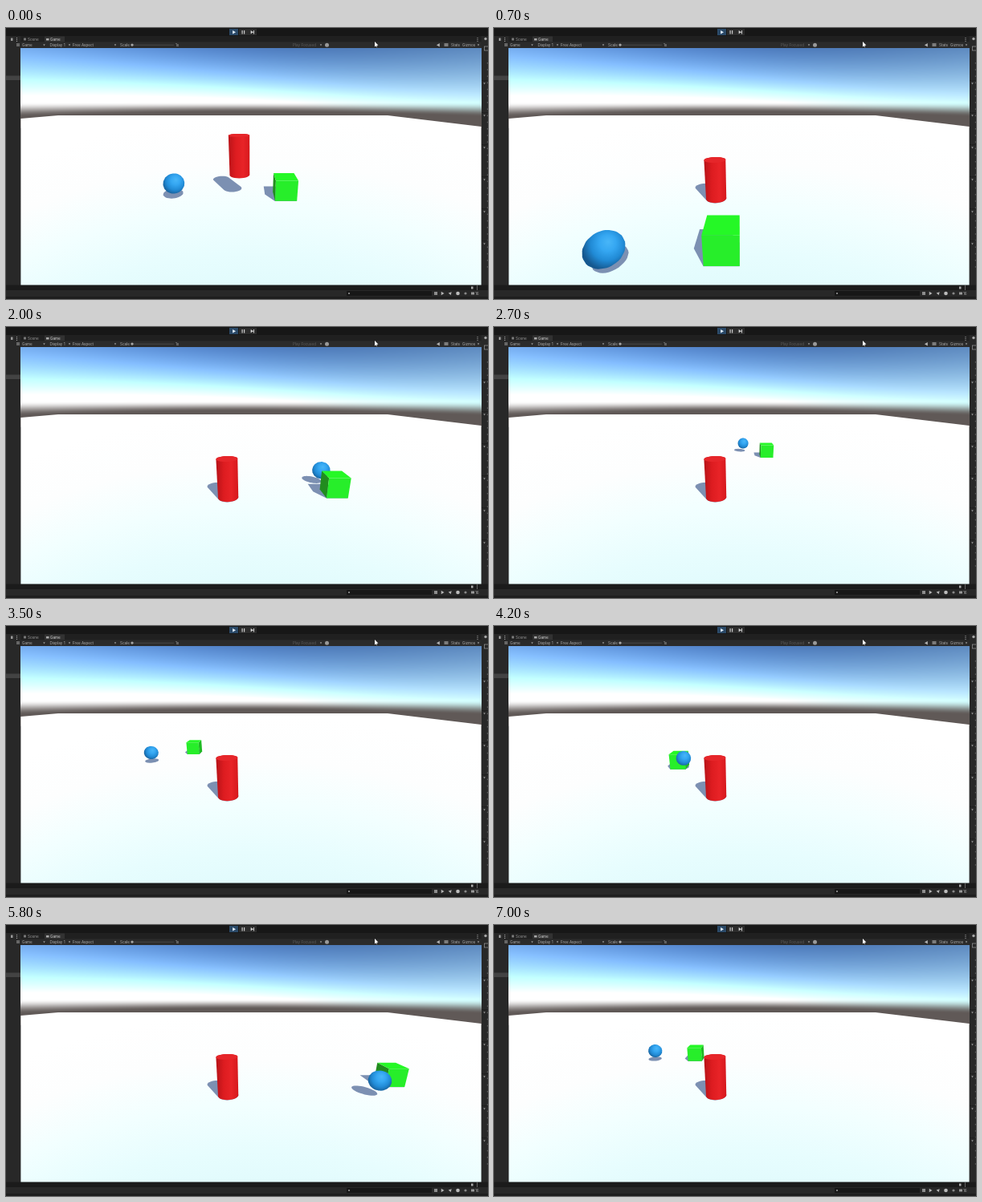
An HTML page with a canvas for the animation above (7.1 s loop, 600 px wide and 338 px high).

```html
<!DOCTYPE html>
<html>
<head>
<meta charset="utf-8">
<style>
  html, body { margin: 0; width: 100%; height: 100%; overflow: hidden; background: #1c1c1c; }
  canvas { display: block; }
</style>
</head>
<body>
<canvas id="stage" width="600" height="338"></canvas>
<script>
const stage = document.getElementById('stage');
let ctx = stage.getContext('2d');

// World: x to the right, y measured down from the camera, z away from it.
const FOCAL = 255.5, CX = 305, CY = 172.5, GROUND = 4.35;
const SIN = Math.sin(17.5 * Math.PI / 180), COS = Math.cos(17.5 * Math.PI / 180);
const LIGHT = [-.32, .77, .56];
const VIEW = { left: 18.4, top: 25, right: 591.6, bottom: 320.6 };

// Key poses on the ground: seconds, sphere x, z, cube x, z
const POSES = [
  [0, -3.55, 8.78, 1.6, 8.97],
  [.5, -4.7, 5.9, .4, 6.8],
  [.9, -1.6, 3.4, -.9, 3.7],
  [1.5, 3.22, 5.47, 2.27, 4.48],
  [2.1, 3.6, 11.6, 4.1, 10.2],
  [2.7, .36, 17.9, 2.22, 16.3],
  [3.5, -7.09, 14.17, -4.8, 17.06],
  [4.1, -4.6, 12.5, -4.6, 13.2],
  [4.9, 5.26, 15.43, 2.47, 14.78],
  [5.8, 5.92, 8.77, 7.4, 10.2],
  [6.4, -.1, 10.2, 4.7, 10],
  [7, -6.04, 14.4, -3.2, 14.78]
];

// Smooth curve through the key poses
function poseAt(t) {
  const last = POSES.length - 1;
  let i = 0;
  while (i < last - 1 && POSES[i + 1][0] <= t) i++;
  const a = POSES[i], b = POSES[i + 1], span = b[0] - a[0], u = (t - a[0]) / span;
  const slope = (k, c) => {
    const p = POSES[Math.max(k - 1, 0)], q = POSES[Math.min(k + 1, last)];
    return (q[c] - p[c]) / (q[0] - p[0]) * span;
  };
  return [1, 2, 3, 4].map(c =>
    a[c] * (1 + 2 * u) * (1 - u) ** 2 + slope(i, c) * u * (1 - u) ** 2 +
    b[c] * u * u * (3 - 2 * u) + slope(i + 1, c) * u * u * (u - 1));
}

function project([x, y, z]) {
  const depth = z * COS + y * SIN, up = z * SIN - y * COS;
  return [CX + FOCAL * x / depth, CY - FOCAL * up / depth];
}

function castShadow([x, y, z]) {
  const reach = (GROUND - y) / LIGHT[1];
  return [x + LIGHT[0] * reach, GROUND, z + LIGHT[2] * reach];
}

function hull(points) {
  points.sort((a, b) => a[0] - b[0] || a[1] - b[1]);
  const chain = list => {
    const out = [];
    for (const p of list) {
      while (out.length > 1) {
        const [a, b] = out.slice(-2);
        if ((b[0] - a[0]) * (p[1] - a[1]) - (b[1] - a[1]) * (p[0] - a[0]) > 0) break;
        out.pop();
      }
      out.push(p);
    }
    return out.slice(0, -1);
  };
  return [...chain(points), ...chain([...points].reverse())];
}

function polygon(points, fill) {
  ctx.beginPath();
  points.forEach(p => ctx.lineTo(...p));
  ctx.closePath();
  ctx.fillStyle = fill;
  ctx.fill();
}

function blend(gradient, ...colors) {
  colors.forEach((color, i) => gradient.addColorStop(i / (colors.length - 1), color));
  return gradient;
}

function ring(x, y, z, r) {
  return Array.from({ length: 28 }, (_, i) => {
    const a = i / 28 * 2 * Math.PI;
    return [x + r * Math.cos(a), y, z + r * Math.sin(a)];
  });
}

function sphere(x, z) {
  const y = 3.6, radius = .465, points = [];
  for (let i = -4; i <= 4; i++) {
    const a = i * Math.PI / 9;
    points.push(...ring(x, y + radius * Math.sin(a), z, radius * Math.cos(a)));
  }
  return { z, points, draw() {
    const [px, py] = project([x, y, z]), r = FOCAL * radius / (z * COS + y * SIN);
    const fill = ctx.createRadialGradient(px + r * .2, py - r * .4, 0, px + r * .1, py - r * .2, r * 1.35);
    polygon(hull(points.map(project)), blend(fill, '#48b6f8', '#35a7f2', '#218bd6', '#15588f'));
  } };
}

function cylinder(x, y, z) {
  const top = ring(x, y - .94, z, .475), points = [...top, ...ring(x, y + .94, z, .475)];
  return { z, points, draw() {
    const px = project([x, y, z])[0], fill = ctx.createLinearGradient(px - 14, 0, px + 14, 0);
    polygon(hull(points.map(project)), blend(fill, '#b81318', '#dd1c20', '#e82327', '#d4181c'));
    polygon(top.map(project), '#e6262a');
  } };
}

function cube(x, z) {
  const corner = ([i, j, k]) => [x + i / 2, 3.84 + j / 2, z + k / 2];
  const square = [[-1, -1], [1, -1], [1, 1], [-1, 1]];
  const face = (at, fill) => polygon(square.map(([a, b]) => project(corner(at(a, b)))), fill);
  const points = [-1, 1].flatMap(k => square.map(([i, j]) => corner([i, j, k])));
  return { z, points, draw() {
    if (Math.abs(x) > .5) {
      const side = -Math.sign(x);
      face((a, b) => [side, a, b], side < 0 ? '#218c1e' : '#1fb923');
    }
    face((a, b) => [a, -1, b], '#25f826');
    face((a, b) => [a, b, -1], '#27ee2a');
  } };
}

// Sky: colour falls off with elevation and is scattered brighter away from the sun
function skyColor(px, py) {
  const v = (CY - py) / FOCAL, h = (px - CX) / FOCAL, length = Math.hypot(1, h, v);
  const up = (v * COS - SIN) / length, ahead = (COS + v * SIN) / length, side = h / length;
  const toSun = side * LIGHT[0] - up * LIGHT[1] + ahead * LIGHT[2];
  const phase = .75 + .75 * toSun ** 2, height = Math.max(up, 0);
  const haze = Math.min(1, Math.max(0, -up / .045)), soil = haze * haze * (3 - 2 * haze);
  return [[275, .2, 96], [330, .27, 89], [350, .5, 87]].map(([glow, fade, ground]) =>
    Math.min(255, glow * Math.exp(-height / fade) * phase) * (1 - soil) + ground * soil);
}

function drawSky() {
  const { left, top, right } = VIEW, x0 = Math.floor(left), w = Math.ceil(right) - x0, h = 100;
  const image = ctx.createImageData(w, h);
  for (let i = 0; i < w * h; i++) {
    image.data.set([...skyColor(x0 + i % w, top + Math.floor(i / w)), 255], i * 4);
  }
  ctx.putImageData(image, x0, top);
}

function drawFloor() {
  const { left, right, bottom } = VIEW;
  polygon([[left, 113], [65, 109], [475, 109], [right, 123], [right, bottom], [left, bottom]],
    blend(ctx.createRadialGradient(310, 900, 560, 310, 900, 790),
      '#dffafc', '#e7fdfe', '#f2ffff', '#fdfefe', '#ffffff'));
}

function box(x, y, w, h, color) {
  ctx.fillStyle = color;
  ctx.fillRect(x, y, w, h);
}

function label(text, x, y = 22.8, color = '#adadad') {
  ctx.font = '4.6px Inter, Roboto, sans-serif';
  ctx.fillStyle = color;
  ctx.fillText(text, x, y);
}

function dot(x, y, r, color = '#a6a6a6') {
  ctx.beginPath();
  ctx.arc(x, y, r, 0, 7);
  ctx.fillStyle = color;
  ctx.fill();
}

function triangle(x, y, r, angle, color = '#b4b4b4') {
  polygon([0, 1, 2].map(i => {
    const a = angle + i * 2 * Math.PI / 3;
    return [x + r * Math.cos(a), y + r * Math.sin(a)];
  }), color);
}

const arrow = (x, y) => triangle(x, y, 1.4, Math.PI / 2, '#999');

function menuDots(x, y) {
  for (let i = 0; i < 3; i++) box(x, y + 2 * i, 1, 1, '#aaa');
}

function drawEditor() {
  const { left, top, right, bottom } = VIEW;
  box(0, 0, 600, 338, '#282828');
  box(0, 0, 600, 10, '#171717');
  box(left, 10, right - left, 7.5, '#202020');
  box(48, 10.5, 25, 7, '#323232');
  box(left, 17.5, right - left, top - 17.5, '#2b2b2b');
  box(0, 59.5, 18, 5.5, '#434343');

  // Transport buttons
  box(278, 1, 11, 8, '#2b4a68');
  box(290, 1, 22, 8, '#2c2c2c');
  triangle(283.4, 5.2, 2.6, 0, '#e4f0ff');
  box(293.5, 3, 1.2, 4.5, '#ccc');
  box(296, 3, 1.2, 4.5, '#ccc');
  triangle(305.8, 5.2, 2.4, 0, '#ccc');
  box(308, 3, 1, 4.5, '#ccc');

  // Tabs and toolbar
  box(6, 12.5, 2.5, 3.5, '#999');
  menuDots(13, 12);
  menuDots(586.5, 12);
  box(22, 12.5, 3, 3, '#777');
  label('Scene', 27, 16.2, '#9c9c9c');
  box(50, 13, 3.5, 2.5, '#aaa');
  label('Game', 55, 16.2, '#d4d4d4');
  box(13, 19, 4, 4, '#666');
  label('Game', 20);
  label('Display 1', 54.5);
  label('Free Aspect', 83);
  label('Scale', 142);
  box(157, 20.8, 52, .7, '#555');
  dot(157, 21.1, 1.7);
  label('1x', 211);
  label('Play Focused', 357, 22.8, '#5c5c5c');
  [47.5, 79, 136, 392, 588].forEach(x => arrow(x, 21));
  dot(399.5, 21.2, 2.5, '#999');
  triangle(538.5, 21.2, 2.6, Math.PI);
  box(545.5, 19, 5, 4, '#7c7c7c');
  label('Stats', 554);
  label('Gizmos', 568);

  // Side panel
  dot(597, 13.5, 1.7);
  ctx.strokeStyle = '#999';
  ctx.lineWidth = .7;
  ctx.strokeRect(595.5, 23, 5, 5);
  for (let y = 43; y < 300; y += 8.2) box(598.8, y, 1.2, 1.5, '#5a5a5a');
  for (let y = 69; y < 300; y += 40) {
    box(592, y - 4, 8, .7, '#1b1b1b');
    arrow(595.5, y);
  }

  // Status area
  box(0, bottom, 600, 6.4, '#1b1b1b');
  box(0, 327, 600, 8, '#282828');
  box(0, 335, 600, 3, '#1e1e1e');
  box(424, 328, 106, 6, '#171717');
  dot(427, 331, 1.1, '#999');
  box(579, 322.5, 2.5, 3, '#aaa');
  menuDots(586, 321.5);
  box(533, 329, 4, 4, '#8c8c8c');
  triangle(543, 331, 2.5, 0);
  triangle(553, 331, 2.4, -.8);
  dot(562.5, 331, 2.3, '#bbb');
  dot(572, 331, 1.6, '#888');
  box(579, 329.5, 4, 3, '#999');
  label('16', 584, 332.8);
}

// The still scenery is painted once and reused as a backdrop.
function makeBackdrop() {
  const layer = document.createElement('canvas'), screen = ctx;
  layer.width = stage.width;
  layer.height = stage.height;
  ctx = layer.getContext('2d');
  drawEditor();
  drawSky();
  drawFloor();
  ctx = screen;
  return layer;
}

function drawCursor() {
  polygon([[459, 17], [459, 23.5], [460.5, 22.2], [462, 24.5], [461.6, 21.8], [463.4, 21.6]], '#fff');
}

const backdrop = makeBackdrop();

function render(now) {
  const t = Math.floor(now % 7100 / 100) / 10;
  const fall = Math.min(1, t / .45), drift = fall * (2 - fall);
  const [sphereX, sphereZ, cubeX, cubeZ] = poseAt(t);
  const bodies = [
    sphere(sphereX, sphereZ),
    cube(cubeX, cubeZ),
    cylinder(-.54 - .53 * drift, 2.38 + 1.02 * fall * fall, 9.2 - .44 * drift)
  ].sort((a, b) => b.z - a.z);

  ctx.drawImage(backdrop, 0, 0);
  ctx.save();
  ctx.beginPath();
  ctx.rect(VIEW.left, VIEW.top, VIEW.right - VIEW.left, VIEW.bottom - VIEW.top);
  ctx.clip();
  bodies.forEach(b => polygon(hull(b.points.map(p => project(castShadow(p)))), '#7c90b2'));
  bodies.forEach(b => b.draw());
  ctx.restore();
  drawCursor();
  requestAnimationFrame(render);
}
requestAnimationFrame(render);
</script>
</body>
</html>
```
